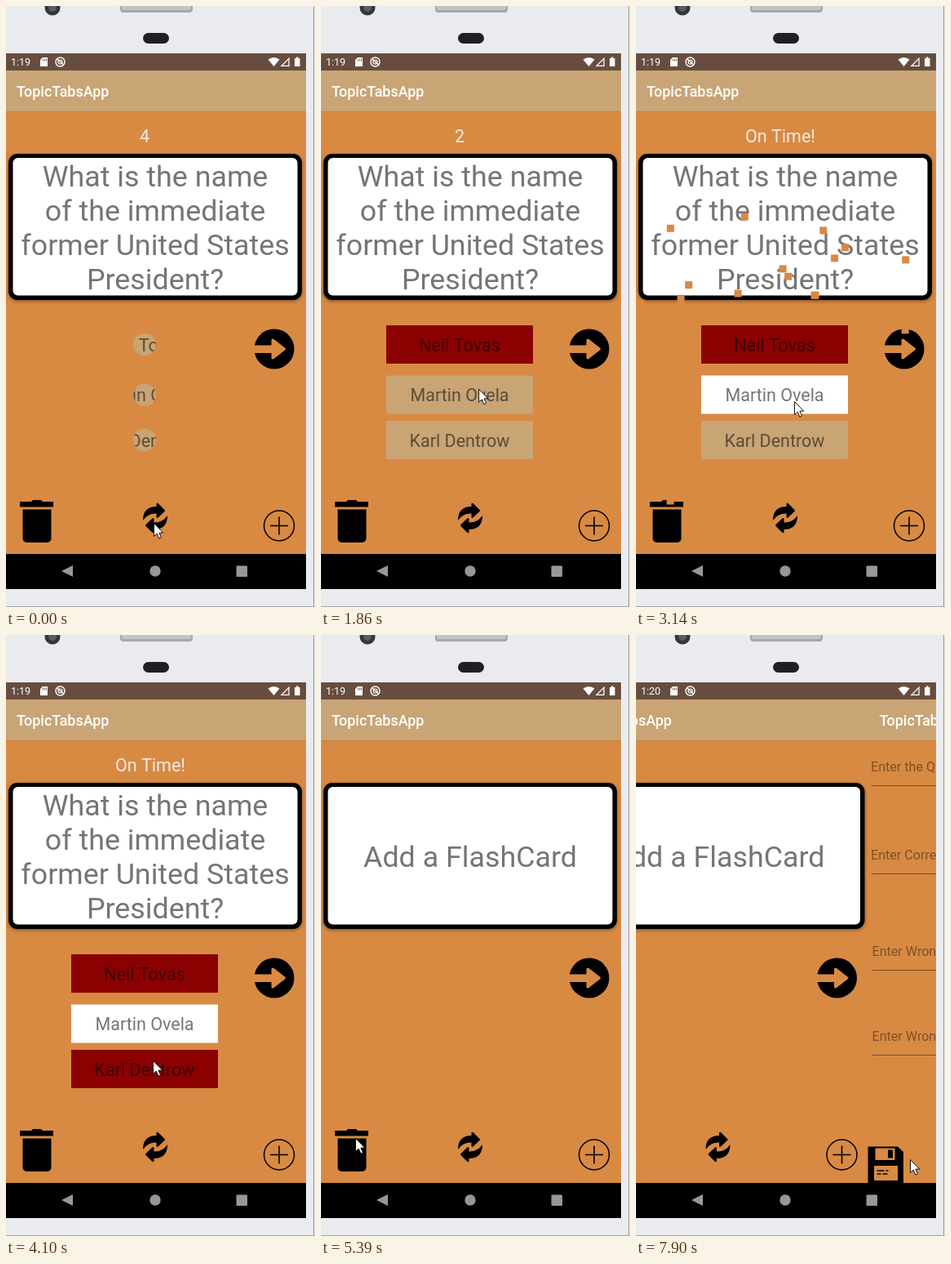
Animation, 379 px wide and 736 px high, one loop 8 s. Source, as an HTML page with a canvas:

```html
<!DOCTYPE html>
<html lang="en">
<head>
<meta charset="utf-8">
<title>Flash cards</title>
<style>
html, body { margin: 0; width: 100%; height: 100%; overflow: hidden; background: #eaebee; }
canvas { display: block; }
</style>
</head>
<body>
<canvas id="stage" width="379" height="736"></canvas>
<script>
const ctx = document.getElementById('stage').getContext('2d');
const LOOP = 8000, SCREEN_W = 368;
const ORANGE = '#d88a43', TAN = '#c9a475', RED = '#8b0000', INK = 'rgba(0,0,0,.54)';
const APP_NAME = 'TopicTabsApp';

const REVEAL_START = -250, REVEAL_TIME = 1000;
const BURST_START = 2500, CLEARED = 5390, CLOCK_TURNS = 6880, PAGE_SLIDES = 7900;

const ANSWERS = [
  { text: 'Neil Tovas', y: 391, picked: 1570, color: RED },
  { text: 'Martin Ovela', y: 452.5, picked: 2560, color: '#fff' },
  { text: 'Karl Dentrow', y: 508, picked: 3950, color: RED }
];

const POINTER_HOME = [181, 633];
const POINTER_MOVES = [
  { from: 120, to: 1200, x: 191, y: 432 },
  { from: 1500, to: 2290, x: 194, y: 484 },
  { from: 3560, to: 3820, x: 180, y: 521 },
  { from: 4220, to: 5120, x: 42, y: 616 },
  { from: 5560, to: 6220, x: 187, y: 625 },
  { from: 6510, to: 7280, x: 336, y: 642 }
];

const clamp01 = v => Math.max(0, Math.min(1, v));
const easeOut = k => 1 - (1 - k) ** 2;
const easeInOut = k => (1 - Math.cos(Math.PI * k)) / 2;

function random(seed) {
  const v = Math.sin(seed * 12.9898) * 43758.5453;
  return v - Math.floor(v);
}

function rect(x, y, w, h, color, radius = 0) {
  ctx.fillStyle = color;
  ctx.beginPath();
  ctx.roundRect(x, y, w, h, radius);
  ctx.fill();
}

function circle(x, y, r, color) {
  ctx.fillStyle = color;
  ctx.beginPath();
  ctx.arc(x, y, r, 0, 2 * Math.PI);
  ctx.fill();
}

function ring(x, y, r, color, width) {
  ctx.strokeStyle = color;
  ctx.lineWidth = width;
  ctx.beginPath();
  ctx.arc(x, y, r, 0, 2 * Math.PI);
  ctx.stroke();
}

function shape(d, color) {
  ctx.fillStyle = color;
  ctx.fill(new Path2D(d));
}

function line(d, color, width) {
  ctx.strokeStyle = color;
  ctx.lineWidth = width;
  ctx.stroke(new Path2D(d));
}

function text(str, x, y, size, color, align = 'left', weight = 400) {
  ctx.font = `${weight} ${size}px Roboto, sans-serif`;
  ctx.textAlign = align;
  ctx.fillStyle = color;
  ctx.fillText(str, x, y);
}

function clipped(addPath, paint) {
  ctx.save();
  ctx.beginPath();
  addPath();
  ctx.clip();
  paint();
  ctx.restore();
}

function drawPhone() {
  rect(0, 0, 379, 736, '#eaebee');
  rect(377, 0, 1, 736, '#96989c');
  rect(0, 735, 379, 1, '#a3a5a9');
  circle(57, 2, 9.5, '#35373b');
  circle(57, 2, 5, '#595d64');
  rect(140, -6, 89, 14, '#a6a7ab', 4);
  rect(142, -6, 85, 11, '#c3c4c8', 3);
  rect(168, 33, 32, 13, '#1e2023', 6.5);
}

function drawStatusBar(t) {
  rect(0, 58, SCREEN_W, 21, '#674d3f');
  text(t < CLOCK_TURNS ? '1:19' : '1:20', 6, 73, 12.5, '#fff');
  shape('M45 63H51V74H42V66Z', '#fff');
  line('M45.5 65V67.5M47.5 65V67.5M49.5 65V67.5', '#674d3f', 0.9);
  ring(66.5, 68.5, 5.5, '#fff', 1.4);
  ring(66.5, 68.5, 2.5, '#fff', 1.2);
  line('M63 65L70.5 72', '#fff', 1.4);
  shape('M321.5 65.5Q328.5 60.5 335.5 65.5L328.5 74Z', '#fff');
  line('M338 73.3H347V64.3Z', '#fff', 1.3);
  shape('M354 64H356V62.5H358.5V64H360.5V74H354Z', '#fff');
}

function drawNavBar() {
  rect(0, 671, SCREEN_W, 43, '#000');
  shape('M68 692L82 685V699Z', '#979797');
  circle(183, 692, 6.7, '#979797');
  rect(282.5, 685.5, 13.5, 13.5, '#979797', 1);
}

function drawCard(lines, firstBaseline) {
  ctx.save();
  ctx.shadowColor = 'rgba(0,0,0,.4)';
  ctx.shadowBlur = 4;
  ctx.shadowOffsetY = 1.5;
  rect(3, 181, 360, 179, '#000', 11);
  ctx.restore();
  rect(8.5, 186, 349, 168.5, '#fff', 6);
  lines.forEach((str, i) => text(str, 183, firstBaseline + 42 * i, 35.8, '#757575', 'center'));
}

function drawAnswers(t) {
  const radius = 94 * easeInOut(clamp01((t - REVEAL_START) / REVEAL_TIME));
  for (const { text: label, y, picked, color } of ANSWERS) {
    clipped(() => ctx.arc(170, y + 23.5, radius, 0, 2 * Math.PI), () => {
      rect(80, y, 180, 47, t < picked ? TAN : color);
      text(label, 170, y + 31.5, 21.5, INK, 'center');
    });
  }
}

function drawTimer(t) {
  const color = '#f3ebe3';
  if (t < BURST_START) {
    const left = 4 - Math.floor((t - REVEAL_START) / 1000);
    text(left, 170, 167, 21.5, color, 'center');
  } else {
    text('On Time!', 134, 167, 21.5, color);
  }
}

function drawIcons() {
  circle(329, 420, 24.5, '#000');
  shape('M303 415.5H325.5V409Q326 406.5 328.5 408L342 418.5Q344 420 342 421.5L328.5 432Q326 433.5 325.5 431V425H303Z', ORANGE);

  shape('M31 607L33 605H43L45 607H58V613.5H17V607Z', '#000');
  rect(20.5, 616.5, 35, 40.5, '#000', [0, 0, 5, 5]);

  // Two arrows, each the other turned half round
  for (const angle of [0, Math.PI]) {
    ctx.save();
    ctx.translate(183, 627);
    ctx.rotate(angle);
    shape('M-15 3Q-15 -14 1.5 -14V-17.5Q2 -18.5 3.5 -18L11.5 -10Q12.5 -9 11.5 -8L3.5 -0.5Q2 0.5 1.5 -1V-5.5Q-9 -6 -15 3Z', '#000');
    ctx.restore();
  }

  ring(335, 636.5, 18.5, '#000', 1.5);
  line('M324 636.5H346M335 625.5V647.5', '#000', 1.6);
}

// Squares fly out of the correct answer in all directions at steady speeds
function drawConfetti(t) {
  const age = t - BURST_START;
  clipped(() => ctx.rect(0, 129, SCREEN_W, 542), () => {
    for (let i = 1; i <= 75; i++) {
      const angle = 2 * Math.PI * random(i);
      const reach = age * (0.19 + 0.19 * random(i + 100));
      rect(165.5 + reach * Math.cos(angle), 471.5 + reach * Math.sin(angle), 9, 9, ORANGE);
    }
  });
}

function drawTitle() {
  text(APP_NAME, 13, 111, 17.9, '#fff', 'left', 500);
}

function drawMainPage(t) {
  drawTitle();
  if (t < CLEARED) {
    drawTimer(t);
    drawCard(['What is the name', 'of the immediate', 'former United States', 'President?'], 221);
    drawAnswers(t);
  } else {
    drawCard(['Add a FlashCard'], 284);
  }
  drawIcons();
  if (t >= BURST_START && t < CLEARED) drawConfetti(t);
}

function drawField(hint, x, y) {
  text(hint, x, y, 16.1, 'rgba(0,0,0,.42)');
  rect(x + 0.5, y + 17, 358, 1, 'rgba(0,0,0,.45)');
}

function drawFormPage() {
  drawTitle();
  drawField('Enter the Question', 2.5, 167);
  drawField('Enter Correct Answer', 2.5, 275);
  drawField('Enter Wrong Answer 1', 4, 393);
  drawField('Enter Wrong Answer 2', 4, 497);
  shape('M-1 626.5H35.5L42.5 633V672H-1Z', '#000');
  rect(8, 628.5, 24, 14.5, ORANGE);
  rect(23.5, 630.5, 6, 10, '#000');
  rect(6.5, 650, 29, 18, ORANGE);
  line('M10 656H19M21 656H24M10 660H15M17 660H23', '#000', 1.4);
}

function drawPointer(t) {
  let [x, y] = POINTER_HOME;
  for (const move of POINTER_MOVES) {
    const k = easeOut(clamp01((t - move.from) / (move.to - move.from)));
    x += (move.x - x) * k;
    y += (move.y - y) * k;
  }
  ctx.save();
  ctx.translate(x + 0.5, y + 0.5);
  const arrow = 'M0 0V16L3.7 12.6L6.3 18.6L9 17.4L6.4 11.6H11.3Z';
  shape(arrow, '#fff');
  line(arrow, '#111', 1);
  ctx.restore();
}

function draw(t) {
  drawPhone();
  clipped(() => ctx.rect(0, 58, SCREEN_W, 656), () => {
    rect(0, 129, SCREEN_W, 542, ORANGE);
    rect(0, 79, SCREEN_W, 50, TAN);
    rect(0, 129, SCREEN_W, 1, 'rgba(0,0,0,.08)');
    const slide = t < PAGE_SLIDES ? 0 : -82.5;
    ctx.save();
    ctx.translate(slide, 0);
    drawMainPage(t);
    ctx.translate(SCREEN_W, 0);
    if (slide) drawFormPage();
    ctx.restore();
    drawStatusBar(t);
    drawNavBar();
  });
  drawPointer(t);
}

const begin = performance.now();
function tick() {
  draw((performance.now() - begin) % LOOP);
  requestAnimationFrame(tick);
}
tick();
</script>
</body>
</html>
```
